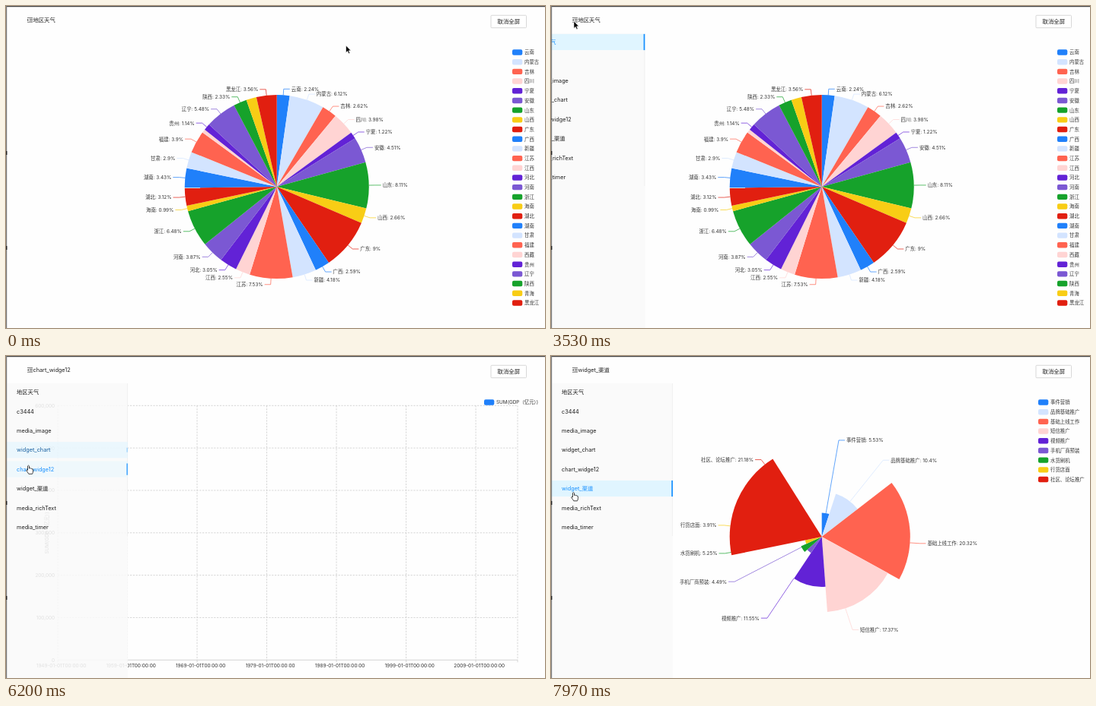
Recreate the animation shown at these times as an HTML page. Size 708 by 424 pixels, loop 8 s.

```html
<!DOCTYPE html>
<html lang="zh-CN">
<head>
<meta charset="utf-8">
<title>Dashboard</title>
<style>
html, body { margin: 0; width: 100%; height: 100%; overflow: hidden; background: #fefefe; }
svg { display: block; width: 708px; height: 424px; }
text { font-family: Inter, "Noto Sans CJK SC", "Noto Sans CJK", sans-serif; white-space: pre; }
</style>
</head>
<body>
<svg id="stage" viewBox="0 0 708 424"></svg>
<script>
const LOOP = 8000;
const SLIDE_AT = 3390, CLOUD_AT = 4720, BARS_AT = 6090, ROSE_AT = 7370;
const PALETTE = ['#2080fa', '#d3e4ff', '#ff6350', '#ffd4d3', '#6222d6', '#7b58d3', '#16a22b', '#f8cd15', '#e11f10'];
const CX = 355.7, CY = 238, R = 121;
const stage = document.getElementById('stage');

function el(tag, attrs, parent = stage) {
  const node = document.createElementNS('http://www.w3.org/2000/svg', tag);
  for (const key in attrs) node.setAttribute(key, attrs[key]);
  parent.appendChild(node);
  return node;
}
const group = (parent) => el('g', {}, parent);
function label(parent, x, y, str, size = 6.4, attrs = {}) {
  const node = el('text', { x, y: y + size * 0.37, 'font-size': size, fill: '#333', ...attrs }, parent);
  node.textContent = str;
  return node;
}
const show = (node, on) => node.setAttribute('display', on ? 'inline' : 'none');
const clamp = (v) => Math.min(1, Math.max(0, v));
const smooth = (v) => v * v * (3 - 2 * v);
const cubicOut = (v) => 1 - (1 - clamp(v)) ** 3;
const mix = (a, b, p) => `rgb(${a.map((v, i) => Math.round(v + (b[i] - v) * p))})`;

// CSS "ease" curve, solved by bisection
function ease(x) {
  let lo = 0, hi = 1;
  const bez = (u, a, b) => 3 * (1 - u) ** 2 * u * a + 3 * (1 - u) * u * u * b + u ** 3;
  for (let i = 0; i < 20; i++) {
    const mid = (lo + hi) / 2;
    if (bez(mid, 0.25, 0.25) < x) lo = mid; else hi = mid;
  }
  return bez(lo, 0.1, 1);
}

const polar = (turn, r) => [CX + r * Math.sin(turn * 2 * Math.PI), CY - r * Math.cos(turn * 2 * Math.PI)];
function wedge(from, to, r) {
  return `M${CX} ${CY}L${polar(from, r)}A${r} ${r} 0 ${to - from > 0.5 ? 1 : 0} 1 ${polar(to, r)}Z`;
}

function legend(parent, names, textX) {
  names.forEach((name, i) => {
    const y = 61 + i * 12.69;
    el('rect', { x: textX - 16, y: y - 3.7, width: 13.3, height: 7.4, rx: 2, fill: PALETTE[i % 9] }, parent);
    label(parent, textX, y, name);
  });
}

function makePie(parent, rows, textX, rose, hidden = []) {
  const labels = group(parent), slices = group(parent);
  const max = Math.max(...rows.map((row) => row[1]));
  let sum = 0;
  const parts = rows.map(([name, value], i) => {
    const from = sum / 100, to = (sum += value) / 100, mid = (from + to) / 2;
    const r = rose ? R * value / max : R, color = PALETTE[i % 9];
    if (!hidden.includes(name)) {
      const [x, y] = polar(mid, R + 8), side = mid < 0.5 ? 1 : -1;
      el('path', { d: `M${polar(mid, r)}L${x} ${y}h${side * 8}`, fill: 'none', stroke: color, 'stroke-width': 0.7 }, labels);
      label(labels, x + side * 10, y, `${name}: ${value}%`, 6.4, { 'text-anchor': side > 0 ? 'start' : 'end' });
    }
    return { from, to, r, node: el('path', { fill: color }, slices) };
  });
  legend(parent, rows.map((row) => row[0]), textX);
  return {
    labels,
    sweep: (p) => parts.forEach((s) => s.node.setAttribute('d', wedge(s.from * p, s.to * p, s.r))),
  };
}

// Region pie
const pieView = group();
const regions = [['云南', 2.24], ['内蒙古', 6.12], ['吉林', 2.62], ['四川', 3.98], ['宁夏', 1.22], ['安徽', 4.51],
  ['山东', 8.11], ['山西', 2.66], ['广东', 9], ['广西', 2.59], ['新疆', 4.18], ['江苏', 7.53], ['江西', 2.55],
  ['河北', 3.05], ['河南', 3.87], ['浙江', 6.48], ['海南', 0.99], ['湖北', 3.12], ['湖南', 3.43], ['甘肃', 2.9],
  ['福建', 3.9], ['西藏', 0.64], ['贵州', 1.14], ['辽宁', 5.48], ['陕西', 2.33], ['青海', 1.8], ['黑龙江', 3.56]];
makePie(pieView, regions, 681, false, ['西藏', '青海']).sweep(1);

// Word cloud: text, x, y, size, colour, rotation
const cloudView = group();
const words = [
  ['广东', 354, 243, 37, '#7d1012'], ['山东', 339.5, 209, 33.5, '#2b8090'], ['江苏', 365, 279, 32, '#2d7a5a'],
  ['浙江', 422, 242, 28, '#12412a'], ['内蒙古', 300.5, 264, 27.5, '#59951a', -90], ['辽宁', 391, 203, 25, '#12a030', -90],
  ['安徽', 420, 269, 21, '#5a1fa0'], ['新疆', 428, 216, 20, '#8e1a1a'], ['福建', 283, 207, 18.5, '#1c1246', -90],
  ['河南', 341.5, 180, 18.5, '#1f8a8c'], ['四川', 275, 251, 18.5, '#3a2a70', 90], ['黑龙江', 251, 247.5, 17.5, '#241050', 90],
  ['湖南', 416, 184, 17.5, '#8e1a1a', -90], ['湖北', 418, 289, 16, '#1d8a5c'], ['河北', 325, 282, 15.5, '#1a7a6a', 90],
  ['甘肃', 340, 254, 15, '#1e3a1a'], ['山西', 380, 304, 14, '#80857c'], ['广西', 459.5, 237, 14, '#5f7f6a', -90],
  ['吉林', 262, 203, 13.5, '#20306a', 90], ['江西', 302, 177.5, 13.5, '#9a3f35', 90], ['陕西', 279.5, 286, 13.5, '#5a2a1a', -90],
  ['云南', 348, 306, 13, '#3a2070'], ['青海', 372, 174, 12, '#5a8aa0', 90], ['宁夏', 437, 198, 9, '#7aab3a'],
  ['贵州', 458, 265.5, 9, '#1a4a5a'], ['海南', 325, 305.5, 8, '#22302a'], ['西藏', 388, 172, 6.3, '#1a6a7a'],
].map(([str, x, y, size, fill, turn = 0]) => label(cloudView, 0, 0, str, size, {
  fill, 'font-weight': 500, 'text-anchor': 'middle', transform: `translate(${x} ${y}) rotate(${turn})`,
}));

// Bar chart
const barView = group();
const LEFT = 68, RIGHT = 672, TOP = 65.3, BASE = 400.3, BAND = (RIGHT - LEFT) / 66;
const gridLine = (d, dash = '2.2 1.6') =>
  el('path', { d, stroke: '#ccc', 'stroke-width': 0.8, fill: 'none', 'stroke-dasharray': dash }, barView);
for (let i = 0; i <= 6; i++) {
  const y = BASE - (BASE - TOP) * i / 6;
  gridLine(`M${LEFT} ${y}H${RIGHT}`, i ? undefined : 'none');
  label(barView, 64, y, (i * 100000).toLocaleString('en-US'), 6.4, { 'text-anchor': 'end' });
}
for (let i = 0; i < 7; i++) {
  const x = LEFT + BAND * 10 * i;
  gridLine(`M${x} ${TOP}V${BASE}`);
  gridLine(`M${x} ${BASE}v3`, 'none');
  label(barView, x + BAND / 2, 408, `${1949 + 10 * i}-01-01T00:00:00`, 6.4, { 'text-anchor': 'middle' });
}
gridLine(`M${RIGHT} ${TOP}V${BASE}`);
gridLine(`M${RIGHT} ${BASE}v3`, 'none');
const MEASURE = 'SUM(GDP（亿元）)';
label(barView, 0, 0, MEASURE, 6.4, { 'text-anchor': 'middle', transform: 'translate(54 233) rotate(-90)' });
legend(barView, [MEASURE], 644);
const bars = group(barView);
const lateBars = [1.8, 3.3, 7, 3.6, 5, 18.5, 24, 29, 34, 37.5, 40.5, 47, 52.5, 58.5, 68, 82, 97, 113, 136, 162, 180, 216, 258, 288, 314.5, 235];
for (let i = 0; i < 66; i++) {
  const height = i < 40 ? 1.6 * Math.exp((i - 39) / 9) : lateBars[i - 40];
  el('rect', { x: LEFT + BAND * (i + 0.5) - 3.2, y: -height, width: 6.4, height, fill: PALETTE[0] }, bars);
}

// Channel rose
const roseView = group();
const rose = makePie(roseView, [['事件营销', 5.53], ['品牌基础推广', 10.4], ['基础上线工作', 20.32], ['短信推广', 17.37],
  ['视频推广', 11.55], ['手机厂商预装', 4.49], ['水货刷机', 5.25], ['行货店面', 3.91], ['社区、论坛推广', 21.18]], 656, true);

// Header
const INK = [30, 30, 30], BLUE = [24, 144, 255];
el('path', { d: 'M28 15.6h7M30.8 17.5h4.2M30.8 19.3h4.2M28 21.2h7', stroke: '#333', 'stroke-width': 0.7 });
const arrow = el('path', { fill: '#333' });
const title = label(stage, 35.5, 18.4, '', 7.3, { fill: '#222' });
el('rect', { x: 637, y: 12.3, width: 46.5, height: 16.4, rx: 1, fill: '#fff', stroke: '#d4d4d4', 'stroke-width': 0.9 });
label(stage, 660.3, 20.4, '取消全屏', 7.4, { 'text-anchor': 'middle', fill: '#222' });

// Sidebar
const menu = ['地区天气', 'c3444', 'media_image', 'widget_chart', 'chart_widge12', 'widget_渠道', 'media_richText', 'media_timer'];
const picks = [[-1000, 0], [CLOUD_AT, 3], [BARS_AT, 4], [ROSE_AT, 5]];
const sidebar = group();
el('rect', { x: 1, y: 36, width: 159, height: 388, fill: '#fafafa', opacity: 0.88 }, sidebar);
el('path', { d: 'M159.6 36V237', stroke: '#eee', 'stroke-width': 0.8 }, sidebar);
const itemY = (i) => 47.5 + 25.4 * i;
const items = menu.map((name, i) => ({
  back: el('rect', { x: 1, y: itemY(i) - 10.6, width: 159, height: 21.2, fill: '#e0f5ff' }, sidebar),
  bar: el('rect', { x: 158.3, y: -10.6, width: 1.7, height: 21.2, fill: '#1890ff' }, sidebar),
  text: label(sidebar, 14, itemY(i), name, 7.3),
}));

// Window edges
el('rect', { width: 708, height: 1.2, fill: '#444' });
el('rect', { width: 1.2, height: 424, fill: '#777' });
for (const y of [191, 316]) el('rect', { y, width: 1.4, height: 5, fill: '#222' });

// Pointer
const pointer = el('path', { d: 'M0 0V9.4L2.2 7.4L3.7 10.7L5.2 10L3.8 6.8H6.6Z', fill: '#000', stroke: '#fff', 'stroke-width': 0.6 });
const hand = el('path', {
  d: 'M-1 .9Q0-.7 1 .9V4L1.6 3.6Q2.6 3.2 3 4.2Q4.2 3.6 4.6 4.8Q6 4.4 6 6V8Q6 9.5 5 11.3H.3Q-1 9-2.8 6.8Q-2.6 5.2-1 6.4Z',
  fill: '#fff', stroke: '#111', 'stroke-width': 0.8,
});
const track = [[0, 446.5, 52], [700, 380, 58], [1170, 151, 60], [1600, 32, 55], [2000, 31, 25], [2450, 28, 19], [2900, 17, 7],
  [3250, 30, 20], [3750, 30, 20], [4500, 23.5, 124.5], [5350, 23.5, 124.5], [5850, 29.5, 144], [6350, 29.5, 144], [6750, 29.5, 179.5], [8000, 29.5, 179.5]];
function pointerAt(t) {
  const i = track.findIndex((step) => step[0] > t);
  const [t0, x0, y0] = track[i - 1], [t1, x1, y1] = track[i];
  const p = smooth((t - t0) / (t1 - t0));
  return [x0 + (x1 - x0) * p, y0 + (y1 - y0) * p];
}

function render(t) {
  const current = picks.filter((pick) => pick[0] <= t).length - 1;
  const [pickedAt, picked] = picks[current];
  const previous = current ? picks[current - 1][1] : -1;
  const open = ease(clamp((t - SLIDE_AT) / 300));
  const [x, y] = pointerAt(t);
  const hovered = open === 0 ? -1 : menu.findIndex((_, i) => Math.abs(y - itemY(i)) < 10.6);

  [pieView, cloudView, barView, roseView].forEach((view, i) => show(view, i === current));
  words.forEach((word, i) => show(word, t > CLOUD_AT + 60 + i * 8));
  bars.setAttribute('transform', `translate(0 ${BASE}) scale(1 ${cubicOut((t - BARS_AT - 140) / 1000)})`);
  rose.sweep(cubicOut((t - ROSE_AT - 48) / 1000));
  rose.labels.setAttribute('opacity', clamp((t - ROSE_AT - 48) / 200));

  title.textContent = menu[picked];
  arrow.setAttribute('d', t < SLIDE_AT ? 'M28 17V19.8L29.9 18.4Z' : 'M29.9 17V19.8L28 18.4Z');

  show(sidebar, open > 0);
  sidebar.setAttribute('transform', `translate(${-160 * (1 - open)} 0)`);
  const fade = smooth(clamp((t - pickedAt) / 250)), grow = smooth(clamp((t - pickedAt) / 170));
  items.forEach(({ back, bar, text }, i) => {
    const on = (now) => i === picked ? now : i === previous ? 1 - now : 0;
    back.setAttribute('opacity', on(fade));
    bar.setAttribute('opacity', on(grow));
    bar.setAttribute('transform', `translate(0 ${itemY(i)}) scale(1 ${on(grow)})`);
    text.setAttribute('fill', mix(INK, BLUE, i === hovered ? 1 : on(fade)));
  });

  show(hand, hovered >= 0);
  show(pointer, hovered < 0);
  for (const node of [hand, pointer]) node.setAttribute('transform', `translate(${x} ${y})`);
}

const start = performance.now();
function tick() {
  render((performance.now() - start) % LOOP);
  requestAnimationFrame(tick);
}
tick();
</script>
</body>
</html>
```
